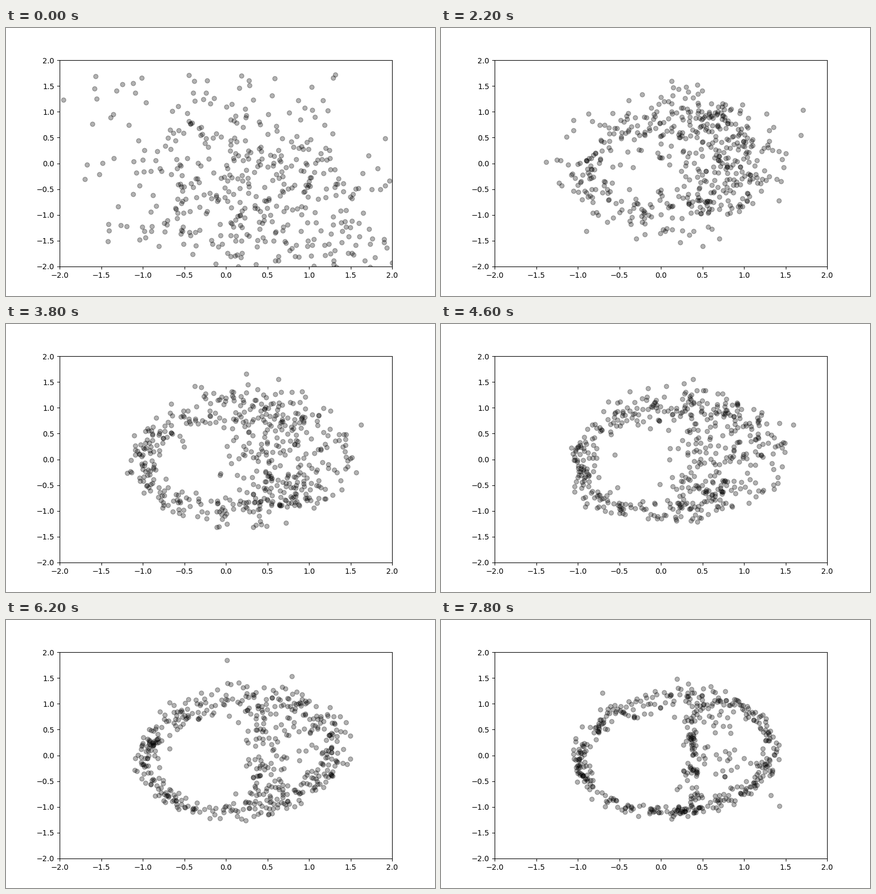
A matplotlib script for the animation above (8000 ms loop, 800 px wide and 500 px high).

```python
import numpy as np
import matplotlib.pyplot as plt
from matplotlib.animation import FuncAnimation

FRAMES, INTERVAL, COUNT = 40, 200, 500
FORMED = 7        # frame at which the cloud has become a ring
CENTER = 0.1


def ring(rng, p):
    """Closed curve that widens to the right and sharpens as p goes 0 to 1."""
    a = rng.uniform(0, 2 * np.pi, COUNT)
    radius = (1.02 + 0.12 * p + (0.135 * p - 0.05) * np.cos(a)
              - 0.07 * np.sin(a) + 0.07 * np.sin(2 * a))
    fuzz = 1 - p
    spread = (0.06 + 0.13 * fuzz ** 2 + 0.09 * fuzz * (1 + np.cos(a))
              + 0.12 * np.maximum(0, np.sin(a - 0.1)) ** 6)
    stray = np.where(rng.random(COUNT) < 0.01, 2.5, 1)
    radius = radius + spread * stray * rng.standard_normal(COUNT)
    return CENTER + radius * np.array([np.cos(a), np.sin(a)])


def band(rng, p):
    """Upright strip inside the ring with a left edge that sharpens."""
    n = rng.standard_normal(COUNT)
    left = 0.1 + 0.45 * (1 - p) ** 2
    x = 0.52 - 0.08 * p + np.where(n < 0, left, 0.32) * n
    y = rng.uniform(-0.95, 1, COUNT) + 0.08 * rng.standard_normal(COUNT)
    return np.array([x, y])


def cloud(rng):
    u, v = rng.standard_normal((2, COUNT))
    return np.array([0.3 + 0.95 * u, -0.45 - 0.3 * u + 1.1 * v])


def sample(frame):
    rng = np.random.default_rng(100 + frame)
    p = max(0, (frame - FORMED) / (FRAMES - 1 - FORMED))
    inside = rng.random(COUNT) < 0.27
    shape = np.where(inside, band(rng, p), ring(rng, p))
    mix = max(0, 1 - frame / FORMED) ** 1.5
    return cloud(rng) * mix + shape * (1 - mix)


fig, ax = plt.subplots(figsize=(8, 5), dpi=100)
ax.set_xlim(-2, 2)
ax.set_ylim(-2, 2)
dots, = ax.plot([], [], "ko", alpha=0.3)


def update(frame):
    dots.set_data(*sample(frame))
    return dots,


anim = FuncAnimation(fig, update, frames=FRAMES, interval=INTERVAL,
                     repeat=True, repeat_delay=0)
plt.show()
```
